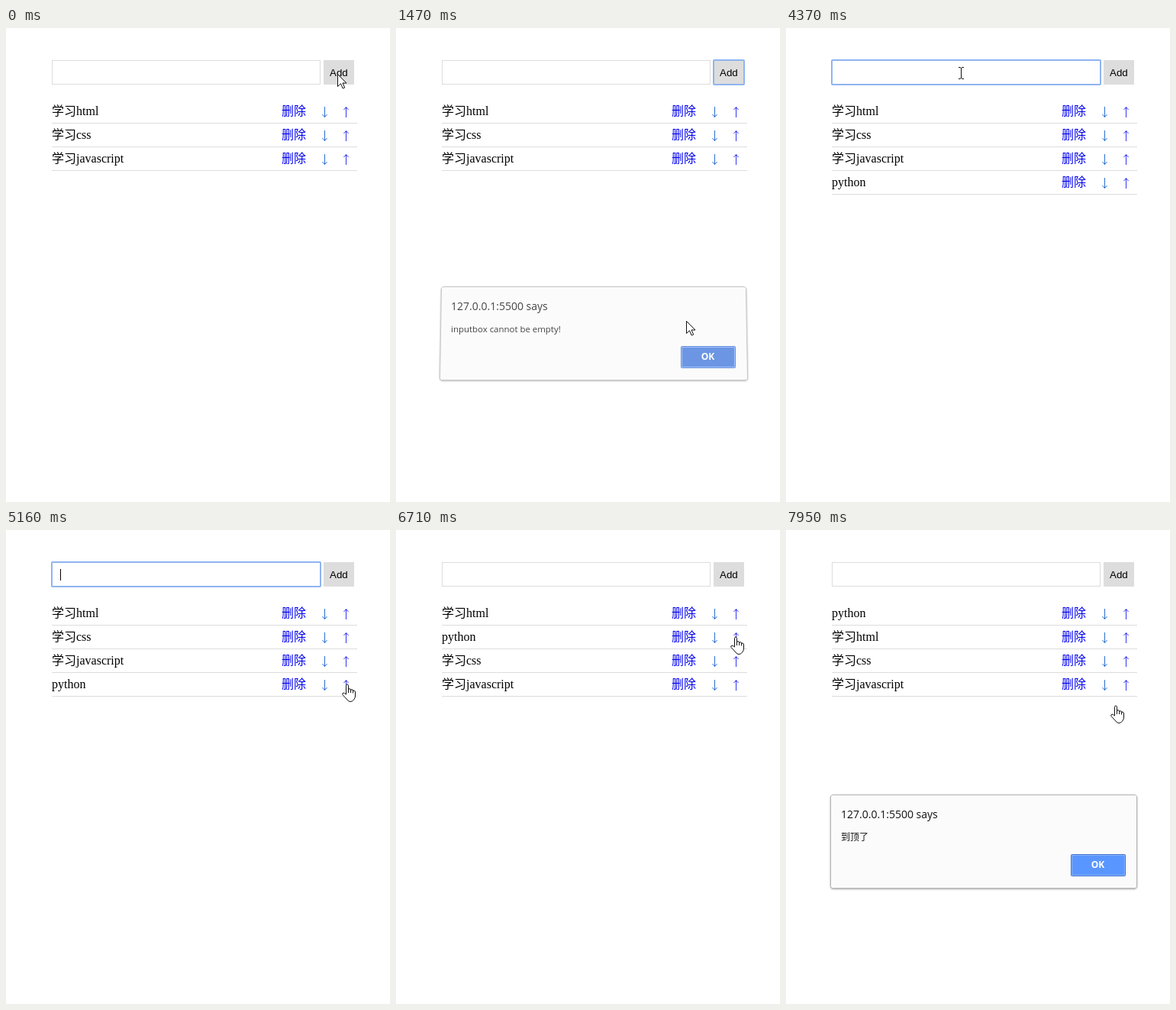
Write an HTML page that moves like this. It is 503x620 px and loops after 8000 ms.

```html
<!DOCTYPE html>
<html lang="zh">
<head>
<meta charset="utf-8">
<title>Todo list</title>
<style>
  html, body { margin: 0; width: 100%; height: 100%; overflow: hidden; background: #fff; }
  svg { display: block; }
  .row text { font: 16px "Liberation Serif", "Noto Sans CJK SC", serif; }
  .row line { stroke: #ddd; }
  .row path { fill: none; }
  .link { fill: #00e; }
  .down { stroke: #2a6fd0; }
  .up { stroke: #33e; }
  .form { font: 13.333px "Liberation Sans", sans-serif; }
  .ring { fill: none; stroke: #8fb4f1; stroke-width: 2; }
  .cursor { fill: #fff; stroke: #111; stroke-linejoin: round; }
  #dialog { filter: drop-shadow(0 1px 1px #0005); }
  #dialog text { font-family: "Open Sans", "Noto Sans CJK SC", sans-serif; fill: #111; }
</style>
</head>
<body>
<svg width="503" height="620">
  <rect x="60.5" y="42.5" width="351" height="31" fill="#fff" stroke="#ddd"/>
  <rect x="416" y="42" width="40" height="32" fill="#ddd"/>
  <text class="form" x="424" y="63">Add</text>
  <rect class="ring" id="inputRing" x="60" y="42" width="352" height="32" rx="1"/>
  <rect class="ring" id="buttonRing" x="416" y="42" width="40" height="32" rx="1"/>
  <text class="form" id="typed" x="71" y="63"></text>
  <rect id="caret" y="51" width="1" height="15"/>
  <g id="list"></g>
  <g id="dialog">
    <path id="panel" fill="#fbfbfb" stroke="#b4b4b4" stroke-linejoin="round"/>
    <text x="72" y="377" font-size="14">127.0.0.1:5500 says</text>
    <text id="message" x="72" y="406"></text>
    <rect id="ok" x="373.5" y="424.5" width="71" height="28" rx="1" stroke="#3a70cc"/>
    <rect x="374.5" y="425.5" width="69" height="26" fill="none" stroke="#8ab4ff"/>
    <text x="408.5" y="442" font-size="12" font-weight="bold" text-anchor="middle" style="fill:#fff">OK</text>
  </g>
  <g class="cursor" id="arrow">
    <path d="M.5.5V16.5L4.5 12.8 7.2 19 9.7 18 7 12H12Z"/>
  </g>
  <g class="cursor" id="beam">
    <path fill="none" d="M-3-7.5H-1L.5-6.5 2-7.5H4M.5-6.5V6.5M-3 7.5H-1L.5 6.5 2 7.5H4"/>
  </g>
  <g class="cursor" id="hand">
    <path transform="translate(-7 -1)" d="M5.5 14V2.5Q5.5 1 7 1T8.5 2.5V7Q11.5 6 11.7 8Q14.5 7 14.7 9Q17.5 8.5 17.5 11V16Q17.5 19 15.5 21Q14 23.5 11 23.5Q8.5 23.5 7 21L1 14.5Q0 12.5 2 12Q3.5 12 5.5 14ZM8.5 7V12M11.6 8V12M14.6 9V12.5"/>
  </g>
</svg>
<script>
// Events are counted in screen steps of TICK ms.
const LOOP = 8000, TICK = 78;
const FOCUS_BUTTON = 2, FOCUS_INPUT = 26, TYPE = 39, ENTER = 50, BLUR = 70;
const MOVE_UP = [71, 81, 89];
const EMPTY_ALERT = 5, PRESS_OK = 16, CLOSE = 19, TOP_ALERT = 99;

const $ = id => document.getElementById(id);
const show = (id, on) => $(id).setAttribute('visibility', on ? 'visible' : 'hidden');
const within = (n, from, to) => n >= from && n < to;
const clamp = (v, lo, hi) => Math.min(hi, Math.max(lo, v));

// The pointer rests between glides
const start = { x: 434, y: 60 };
const glides = [
  { from: 9, to: 17, x: 405, y: 437 },
  { from: 18, to: 25, x: 229, y: 59 },
  { from: 58, to: 66, x: 447, y: 202 },
  { from: 71, to: 76, x: 443, y: 167 },
  { from: 81, to: 84, x: 445, y: 140 },
  { from: 89, to: 91, x: 450, y: 120 },
  { from: 96, to: 98, x: 447, y: 103 },
  { from: 99, to: 102, x: 432, y: 230 }
];

function pointer(n) {
  let { x, y } = start;
  for (const g of glides) {
    const k = clamp((n - g.from) / (g.to - g.from), 0, 1);
    x += (g.x - x) * k;
    y += (g.y - y) * k;
  }
  return [Math.round(x), Math.round(y)];
}

function drawPointer(n) {
  const [x, y] = pointer(n);
  const overInput = x < 412 && y < 74, overLinks = n > ENTER && x > 413 && y > 94;
  const kind = overInput ? 'beam' : overLinks ? 'hand' : 'arrow';
  for (const id of ['arrow', 'beam', 'hand']) show(id, id === kind);
  $(kind).setAttribute('transform', `translate(${x} ${y})`);
}

function drawInput(n) {
  show('buttonRing', within(n, FOCUS_BUTTON, FOCUS_INPUT));
  show('inputRing', within(n, FOCUS_INPUT, BLUR));
  const letters = n < ENTER ? clamp(Math.floor(1 + .77 * (n - TYPE)), 0, 6) : 0;
  $('typed').textContent = 'python'.slice(0, letters);
  const width = letters ? $('typed').getComputedTextLength() : 0;
  $('caret').setAttribute('x', 71 + Math.floor(width));
  const idle = n < TYPE ? n - FOCUS_INPUT : Math.max(0, n - ENTER + 1);
  show('caret', within(n, FOCUS_INPUT, BLUR) && idle % 14 < 7);
}

function drawList(n) {
  const items = ['学习html', '学习css', '学习javascript'];
  if (n >= ENTER) items.splice(MOVE_UP.filter(k => n < k).length, 0, 'python');
  const html = items.map((item, i) => `<g class="row" transform="translate(0 ${31 * i})">
    <text x="60" y="114">${item}</text>
    <text class="link" x="361" y="114">删除</text>
    <path class="down" d="M417.5 103V116.5M414.5 113L417.5 116.5 420.5 113"/>
    <path class="up" d="M445.5 117V103.5M442.5 107L445.5 103.5 448.5 107"/>
    <line x1="60" x2="460" y1="124.5" y2="124.5"/></g>`).join('');
  if (drawList.last !== html) $('list').innerHTML = drawList.last = html;
}

function drawDialog(n) {
  const second = n >= TOP_ALERT, age = n - (second ? TOP_ALERT : EMPTY_ALERT);
  show('dialog', within(n, EMPTY_ALERT, CLOSE + 1) || second);
  // The panel fades, rises and leans as it opens and closes
  const open = n === CLOSE ? .43 : clamp((age + 1) / 3, 0, 1);
  const lift = 14 * (1 - open), lean = lift / 8;
  $('dialog').setAttribute('opacity', open ** .3);
  $('dialog').setAttribute('transform', `translate(0 ${-Math.round(lift)})`);
  $('panel').setAttribute('d',
    `M${60.5 + lean} 346.5H${457.5 - lean}l2 2L${459.5 + lean} 466.5l-2 2H${60.5 - lean}l-2-2L${58.5 + lean} 348.5Z`);
  $('message').textContent = second ? '到顶了' : 'inputbox cannot be empty!';
  $('message').setAttribute('font-size', second ? 12 : 11.45);
  $('ok').setAttribute('fill', within(n, PRESS_OK, CLOSE + 1) ? '#4279db' : '#5a96ff');
}

function frame(now) {
  const n = Math.floor((now % LOOP + 12) / TICK);
  drawInput(n);
  drawList(n);
  drawDialog(n);
  drawPointer(n);
  requestAnimationFrame(frame);
}
requestAnimationFrame(frame);
</script>
</body>
</html>
```
